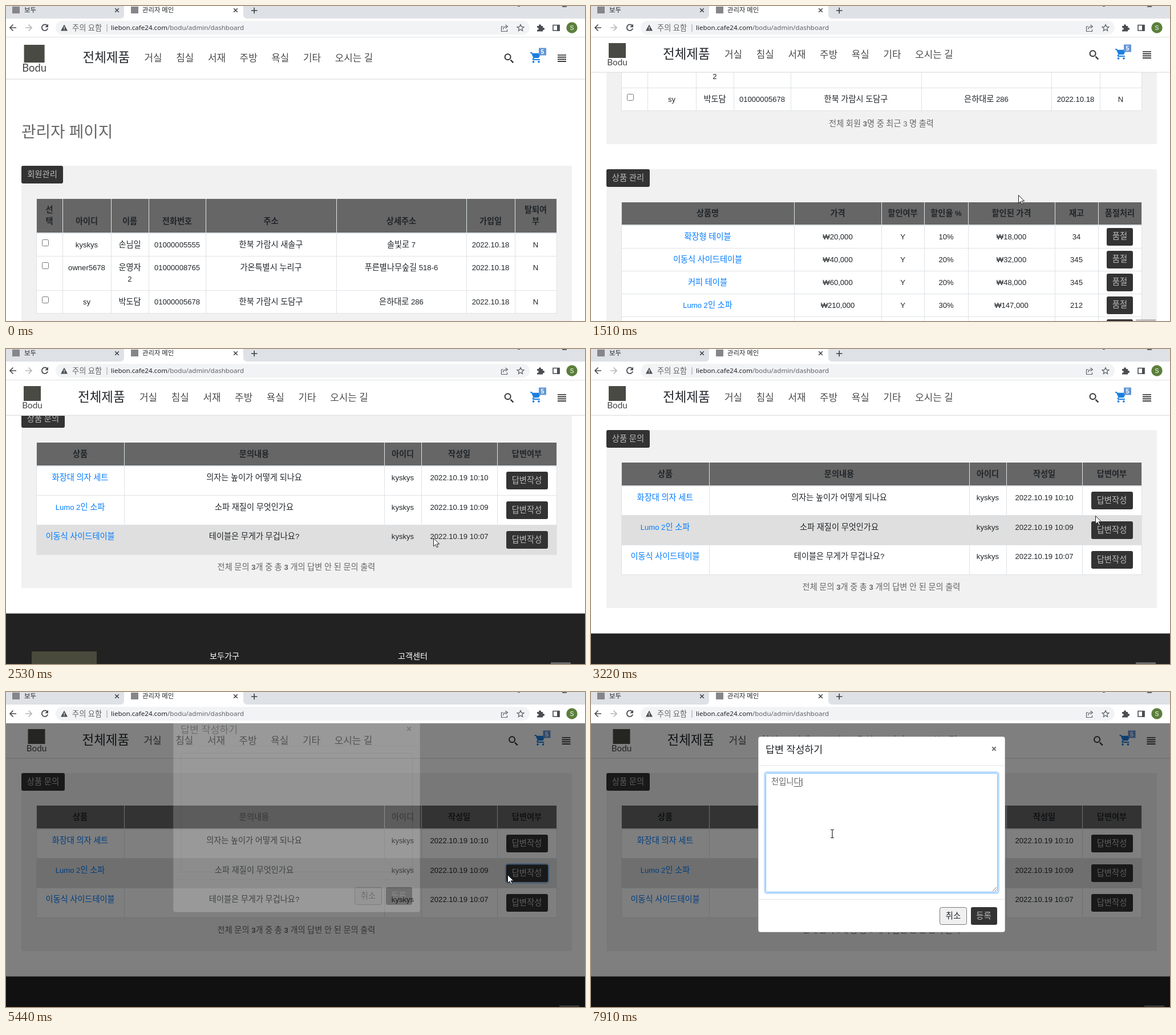
Recreate the animation shown at these times as an HTML page. Size 1015x552 px, loop 8000 ms.

```html
<!DOCTYPE html>
<html lang="ko">
<head>
<meta charset="utf-8">
<title>관리자 메인</title>
<style>
html, body { margin: 0; width: 100%; height: 100%; overflow: hidden; background: #fff; }
svg { display: block; width: 1015px; height: 552px; }
text { font-family: "Liberation Sans", "Noto Sans CJK KR", "Noto Sans CJK", sans-serif; fill: #212529; white-space: pre; }
.k { font-size: 1.085em; }
.b { font-weight: 700; }
.thin { font-weight: 300; }
.link { fill: #007bff; }
.grey { fill: #666; }
.nav { fill: #4c4c4c; }
.pale { fill: #bbb; }
.white { fill: #fff; }
.url { font-family: "Noto Sans", "Noto Sans CJK KR", sans-serif; }
.foot { font-family: "Open Sans", "Noto Sans CJK KR", sans-serif; fill: #bbb; }
.brand { font-family: Lato, sans-serif; fill: #444; }
</style>
</head>
<body>
<svg id="stage" viewBox="0 0 1015 552" xmlns="http://www.w3.org/2000/svg"></svg>
<script>
const LINE = '#dee2e6', DARK = '#333';
const ROW = 51.7, ROWS_TOP = 1139;

// Hangul runs are set slightly larger than Latin; *x* is bold.
const markup = s => s
  .replace(/\*(.+?)\*/g, '<tspan class="b">$1</tspan>')
  .replace(/[ㄱ-힣]+/g, '<tspan class="k">$&</tspan>');
const text = (x, cy, size, s, cls = '', anchor = 'start') =>
  `<text x="${x}" y="${cy + size * .37}" font-size="${size}" class="${cls}" text-anchor="${anchor}">${markup(s)}</text>`;
const rect = (x, y, w, h, fill, extra = '') =>
  `<rect x="${x}" y="${y}" width="${w}" height="${h}" fill="${fill}" ${extra}/>`;
const stroke = (d, color, w, extra = '') =>
  `<path d="${d}" fill="none" stroke="${color}" stroke-width="${w}" ${extra}/>`;
const group = (id, body, extra = '') => `<g id="${id}" ${extra}>${body}</g>`;
const buttonWidth = label => Math.round([...label].reduce((sum, c) => sum + (c === ' ' ? 3.6 : 13.2), 20));
const button = (x, y, label, id = '') => {
  const w = buttonWidth(label);
  return rect(Math.round(x), Math.round(y), w, 31, DARK, 'rx="3"') +
    `<g id="${id}">${text(x + w / 2, y + 15, 13.2, label, 'pale', 'middle')}</g>`;
};

function cell(s, left, right, top, h) {
  const mid = (left + right) / 2;
  if (s === '[]') return rect(left + 10.5, top + 11.5, 11, 11, '#fff', 'rx="2" stroke="#767676"');
  if (s[0] === '#') {
    const label = s.slice(1);
    return button(mid - buttonWidth(label) / 2, top + (h - 31) / 2, label, 'label' + Math.round(top));
  }
  const link = s[0] === '@';
  return (link ? s.slice(1) : s).split('\n')
    .map((part, i) => text(mid, top + 20 + i * 20, 13.1, part, link ? 'link' : '', 'middle')).join('');
}

function table(cols, top, headH, heads, rows, rowId = '') {
  const left = cols[0], width = cols[cols.length - 1] - left;
  let y = top + headH;
  let out = rect(left, top, width, headH, '#666');
  heads.forEach((head, i) => {
    const parts = head.split('\n');
    parts.forEach((part, n) => out += text((cols[i] + cols[i + 1]) / 2,
      y - 21 - 20 * (parts.length - 1 - n), 13.1, part, 'b', 'middle'));
  });
  rows.forEach(({ h, cells }, r) => {
    out += rect(left, y, width, h, '#fff', rowId && `id="${rowId}${r}"`);
    cells.forEach((s, i) => out += cell(s, cols[i], cols[i + 1], y, h));
    out += stroke(`M${left} ${Math.floor(y) + .5}h${width}`, LINE, 1);
    y += h;
  });
  const rules = cols.map(x => `M${x + .5} ${top}V${y}`).join('');
  return out + stroke(`M${left} ${top + headH}h${width}`, LINE, 2) +
    stroke(`M${left} ${Math.floor(y) + .5}h${width + 1}${rules}`, LINE, 1);
}

const section = (top, bottom, label, body, summary, summaryY) =>
  rect(27, top, 965, bottom - top, '#f1f1f1') + button(27, top, label) + body +
  text(509, summaryY, 13.1, summary, 'grey', 'middle');

const members = section(280, 597, '회원관리', table(
  [53, 99, 184, 250, 350, 579, 807, 892, 965], 338, 60,
  ['선\n택', '아이디', '이름', '전화번호', '주소', '상세주소', '가입일', '탈퇴여\n부'],
  [
    [40, 'kyskys', '손님일', '01000005555', '한북 가람시 새솔구', '솔빛로 7'],
    [60, 'owner5678', '운영자\n2', '01000008765', '가온특별시 누리구', '푸른별나무숲길 518-6'],
    [40, 'sy', '박도담', '01000005678', '한북 가람시 도담구', '은하대로 286']
  ].map(([h, ...info]) => ({ h, cells: ['[]', ...info, '2022.10.18', 'N'] }))
), '전체 회원 *3*명 중 최근 3 명 출력', 561);

const products = section(641, 997, '상품 관리', table(
  [53, 356, 509, 584, 661, 813, 889, 965], 699, 40,
  ['상품명', '가격', '할인여부', '할인율 %', '할인된 가격', '재고', '품절처리'],
  [
    ['확장형 테이블', 20, 10, 34],
    ['이동식 사이드테이블', 40, 20, 345],
    ['커피 테이블', 60, 20, 345],
    ['Lumo 2인 소파', 210, 30, 212],
    ['화장대 의자 세트', 150, 10, 120]
  ].map(([name, price, off, stock]) => ({ h: 40, cells: ['@' + name, `₩${price},000`, 'Y', off + '%',
    `₩${price * (100 - off) / 100},000`, String(stock), '#품절'] }))
), '전체 상품 *24*개 중 최근 5 개 출력', 961);

const inquiries = section(1041, 1353, '상품 문의', table(
  [53, 207, 663, 728, 861, 965], 1098, 41,
  ['상품', '문의내용', '아이디', '작성일', '답변여부'],
  [
    ['화장대 의자 세트', '의자는 높이가 어떻게 되나요', '10:10'],
    ['Lumo 2인 소파', '소파 재질이 무엇인가요', '10:09'],
    ['이동식 사이드테이블', '테이블은 무게가 무겁나요?', '10:07']
  ].map(([item, question, time]) => ({ h: ROW,
    cells: ['@' + item, question, 'kyskys', '2022.10.19 ' + time, '#답변작성'] })), 'row'
), '전체 문의 *3*개 중 총 *3* 개의 답변 안 된 문의 출력', 1316);

const footLines = (x, lines) => lines.map((s, i) => text(x, 425 + i * 21.4, 11.3, s, 'foot')).join('');
const footer = `<g transform="translate(0 1094)">` +
  rect(0, 303.5, 1015, 400, '#222') + rect(45, 370, 114, 102, '#4a4a3c') +
  `<text x="101" y="520" font-size="58" text-anchor="middle" class="brand" style="fill:#4a4a3c">Bodu</text>` +
  text(357, 378, 13, '보두가구', 'white') + text(687, 378, 13, '고객센터', 'white') +
  footLines(357, ['주소 : 가람북도 한별시 도담구 은하대로 731', '사업자 등록번호 : 000-456-12345',
    '대표자 : 박솔빛', '통신판매업 신고 : 2000-통신판매업-00-41']) +
  footLines(687, ['Tel : 0000-5678 (평일 09:00 ~ 18:00)', 'Fax : 000-000-5678', 'Email : helpdesk@bodu.example']) +
  [691, 721, 751].map(x => `<circle cx="${x}" cy="514" r="6.5" fill="#bbb"/>`).join('') + '</g>';

const cart = 'M7 18a2 2 0 1 0 0 4a2 2 0 0 0 0-4zM1 2v2h2l3.6 7.6-1.35 2.4c-.7 1.3.2 3 1.75 3h12v-2H7.4l-.2-.4.9-1.6h7.45c.75 0 1.4-.4 1.75-1l3.6-6.5A1 1 0 0 0 20 4H5.2l-.9-2zM17 18a2 2 0 1 0 0 4a2 2 0 0 0 0-4z';
const header = rect(-20, 40, 1055, 76, '#fff', 'id="bar"') + group('barLine', rect(-20, 115.5, 1055, 1.5, '#e4e4e4')) +
  group('logo', rect(3, 0, 30, 26, '#4a4a44') + `<text x="18" y="39" font-size="15.3" text-anchor="middle" class="brand">Bodu</text>`) +
  group('nav', text(126, 84, 20.7, '전체제품', 'thin') +
    ['거실', '침실', '서재', '주방', '욕실', '기타', '오시는 길']
      .map((s, i) => text(234 + i * 55.7, 85, 15.6, s, 'thin nav')).join('')) +
  group('tools',
    stroke('M884.5 88.5l4.8 4.8', '#333', 2.4) + '<circle cx="879.6" cy="83.3" r="5" fill="none" stroke="#333" stroke-width="2"/>' +
    `<path transform="translate(918 73) scale(.94)" d="${cart}" fill="#1a7fe0"/>` +
    rect(934, 67.5, 13, 13, '#6496d6') + text(940.5, 74, 10.5, '5', 'white b', 'middle') +
    stroke('M967 80h15m-15 3.7h15m-15 3.7h15m-15 3.7h15', '#222', 1.7));

const cross = (x, y, r, w, color) => stroke(`M${x - r} ${y - r}l${2 * r} ${2 * r}m0 ${-2 * r}l${-2 * r} ${2 * r}`, color, w);
const browser = rect(0, 0, 1015, 55, '#fff') + rect(0, 0, 1015, 22, '#dee1e6') +
  '<path d="M200 22q7 0 7-7V0h209v15q0 7 7 7z" fill="#fff"/>' +
  rect(11, 1, 13, 12, '#85858a') + text(32, 7, 10.5, '보두') + cross(194.5, 7.5, 3.3, 1.5, '#3c4043') +
  rect(219, 1, 13, 12, '#85858a') + text(239, 7, 10.5, '관리자 메인') + cross(402.5, 7.5, 3.3, 1.5, '#3c4043') +
  stroke('M430 8h10.5M435.2 2.7v10.5', '#3c4043', 1.6) +
  rect(897, 0, 4, 1, '#555') + rect(975, 0, 8, 2, '#666') +
  stroke('M18 38H7m5.5-5.5L7 38l5.5 5.5', '#4a4d51', 1.7) + stroke('M34 38h11m-5.5-5.5L45 38l-5.5 5.5', '#b5b8bb', 1.7) +
  stroke('M72.3 34.5a5.3 5.3 0 1 0 .9 4.8', '#4a4d51', 1.8) + '<path d="M74 31.5v5.8h-5.8z" fill="#4a4d51"/>' +
  rect(87, 26, 831, 24, '#f1f3f4', 'rx="12"') +
  '<path d="M102 32.5l6 11H96z" fill="#4a4d51"/>' + rect(101.4, 36.5, 1.3, 3.2, '#fff') + rect(101.4, 40.6, 1.3, 1.3, '#fff') +
  text(116, 38, 12.2, '주의 요함', 'grey') + rect(176.5, 32, 1, 13, '#9aa0a6') +
  `<text x="184" y="42.3" font-size="11.55" class="url">liebon.cafe24.com<tspan fill="#5f6368">/bodu/admin/dashboard</tspan></text>` +
  stroke('M872 36h-3.5v8.5h10V41M871.5 41q.5-5 6-5.2m-2-2.8l4 3-4 3', '#5f6368', 1.2) +
  stroke('M902 32.5l1.7 3.8 4.1.4-3.1 2.7.9 4.1-3.6-2.2-3.6 2.2.9-4.1-3.1-2.7 4.1-.4z', '#5f6368', 1.3) +
  '<path d="M931 35h3.2a2 2 0 1 1 3.6 0h3.4v3.2a2 2 0 1 1 0 3.6v2.7H931v-3a1.9 1.9 0 1 0 0-3.4z" fill="#4a4d51"/>' +
  stroke('M959 33.5h11v9.5h-11z', '#4a4d51', 1.6) + rect(966, 33, 4.5, 11, '#4a4d51') +
  '<circle cx="992" cy="38" r="9.7" fill="#5b7f3b"/>' + text(992, 38, 10.5, 'S', 'white', 'middle') +
  rect(0, 54, 1015, 1, '#dfe1e3');

const modal = rect(293, 78, 433, 343, '#fff', 'rx="4" stroke="#777" stroke-width=".6"') +
  text(306, 101, 16, '답변 작성하기') + cross(706.5, 99.5, 3.2, 2.2, '#777') +
  rect(293, 128.5, 433, 1, LINE) + rect(293, 363, 433, 1, LINE) +
  rect(304.5, 140.5, 410, 212, 'none', 'id="ring" rx="4" stroke="#bfdeff" stroke-width="3"') +
  rect(306.5, 142.5, 406, 208, '#fff', 'id="area" rx="3"') +
  stroke('M704 349l7-7m-3 7l3-3', '#777', 1) +
  group('typed', '') + rect(316, 165, 13, 1, '#495057', 'id="under"') + rect(316, 151, 1, 14, '#222', 'id="caret"') +
  rect(611.5, 377.5, 47, 30, '#f0f0f0', 'rx="3" stroke="#777"') + text(635, 392, 13.2, '취소', '', 'middle') +
  button(665.5, 377, '등록');

const cursors =
  group('arrow', '<path d="M.5.5v14.3l3.4-3.2 2.3 5 2.2-1-2.3-4.8h4.6z" fill="#fff" stroke="#222"/>') +
  group('hand', '<path transform="translate(-6 -1)" d="M5 2c0-1.6 2.8-1.6 2.8 0v6l6 1.4c2 .5 3 1.5 2.7 3.5l-1.4 5.3v2.8H7.2C6.5 18.5 3 15 1.4 12.5c-.8-1.4.8-2.6 2-1.5L5 12.7z" fill="#fff" stroke="#222"/>') +
  group('beam', stroke('M-3-6.5h2.5l.5.5.5-.5H3M0-6V7M-3 7.5h2.5L0 7l.5.5H3', '#222', 1.2));

document.getElementById('stage').innerHTML =
  rect(0, 0, 1015, 552, '#fff') +
  group('page', text(27, 221, 25.6, '관리자 페이지', 'thin grey') + members + products + inquiries + footer +
    rect(876, 1200.4, 75, 33, 'none', 'id="focus" rx="4" stroke="#7fb5ee" stroke-width="2"')) +
  rect(955, 549, 35, 3, '#999', 'id="topButton" opacity=".6"') + group('header', header) +
  rect(0, 54, 1015, 498, '#000', 'id="shade"') + group('modal', modal) + browser + group('cursor', cursors);

const el = {};
document.querySelectorAll('[id]').forEach(node => el[node.id] = node);
const set = (id, attrs) => { for (const name in attrs) el[id].setAttribute(name, attrs[name]); };
const show = (id, on) => set(id, { visibility: on ? 'inherit' : 'hidden' });
const clamp = v => Math.max(0, Math.min(1, v));

// Progress in n held steps, the first one landing on `from`.
const steps = (t, from, to, n) =>
  t < from ? 0 : Math.min(1, (Math.floor((t - from) / (to - from) * (n - 1) + .15) + 1) / n);

const path = [
  [190, 905, -20], [950, 749, 331], [2780, 749, 331], [3170, 872, 284], [3220, 884, 292], [3770, 918, 321],
  [4229, 918, 321], [4230, 917, 320], [4559, 917, 320], [4560, 918, 321], [5160, 918, 321],
  [5440, 880, 320], [5870, 423, 248]
];
function pointer(t) {
  const i = path.findIndex(p => p[0] > t);
  if (i < 1) return (i ? path[path.length - 1] : path[0]).slice(1);
  const [t0, x0, y0] = path[i - 1], [t1, x1, y1] = path[i], p = (t - t0) / (t1 - t0);
  return [x0 + (x1 - x0) * p, y0 + (y1 - y0) * p];
}

const typing = [[6820, 'ㅊ'], [6900, '처'], [7020, '천'], [7290, '천ㅇ'], [7360, '천이'], [7430, '천입'],
  [7630, '천입ㄴ'], [7720, '천입니'], [7810, '천입니ㄷ'], [7910, '천입니다']];
let shown = '';

function render(t) {
  const down = steps(t, 1020, 1790, 12), end = steps(t, 1920, 2130, 4);
  const up = clamp(steps(t, 2390, 3170, 12) * 2), open = steps(t, 5160, 5940, 12);
  const scroll = 899 * down ** 2.29 + 200 * (1 - (1 - end) ** 2.66) - 200 * (1 - (1 - up) ** 2.5);
  const tall = clamp(1 - down * 3), shift = open ? 7.5 : 0;

  set('page', { transform: `translate(0 ${-Math.round(scroll)})` });
  set('header', { transform: `translate(${shift} 0)` });
  set('bar', { height: 76 + 12 * tall });
  set('barLine', { transform: `translate(0 ${12 * tall})` });
  set('logo', { transform: `translate(28 ${65 + 3 * tall}) scale(${1 + .2 * tall})` });
  set('nav', { transform: `translate(${8.5 * tall} ${6 * tall})` });
  set('tools', { transform: `translate(0 ${6 * tall})` });
  set('topButton', { x: 955 + 2 * shift });
  show('topButton', scroll > 300);

  const [x, y] = pointer(t);
  const over = open ? 1 : x > 53 && x < 965 ? Math.floor((y + scroll - ROWS_TOP) / ROW) : -1;
  const inRow = y + scroll - ROWS_TOP - over * ROW;
  const onButton = !open && over >= 0 && over < 3 && x > 877 && x < 950 && inRow > 10 && inRow < 42;
  for (let r = 0; r < 3; r++) {
    set('row' + r, { fill: r === over ? '#dfdfdf' : '#fff' });
    el['label' + Math.round(ROWS_TOP + r * ROW)].firstChild.style.fill = onButton && r === over ? '#151515' : '';
  }

  const enter = clamp((open * 12 - 4) / 5), focused = t >= 6010;
  set('shade', { opacity: .5 * clamp((open * 12 - 1) / 3) });
  set('modal', { opacity: enter, transform: `translate(0 ${-50 * (1 - enter) ** 1.6})` });
  show('modal', enter > 0);
  show('focus', open > 0 && enter < 1);
  set('ring', { opacity: t >= 6140 ? 1 : focused ? .5 : 0 });
  set('area', { stroke: focused ? '#80bdff' : '#ced4da' });

  const value = typing.reduce((last, [at, s]) => t >= at ? s : last, '');
  if (value !== shown) el.typed.innerHTML = text(316, 157, 13.2, shown = value, 'grey');
  set('under', { x: 316 + 13.2 * (value.length - 1) });
  show('under', value.length > 0);
  set('caret', { x: 316.5 + 13.2 * value.length });
  show('caret', focused && (t < 6550 || t >= 6820));

  const kind = enter === 1 && x > 306 && x < 713 ? 'beam' : onButton ? 'hand' : 'arrow';
  for (const id of ['arrow', 'hand', 'beam']) show(id, id === kind);
  set('cursor', { transform: `translate(${Math.round(x)} ${Math.round(y)})` });
}

const start = performance.now();
(function frame() {
  render((performance.now() - start) % 8000);
  requestAnimationFrame(frame);
})();
</script>
</body>
</html>
```
